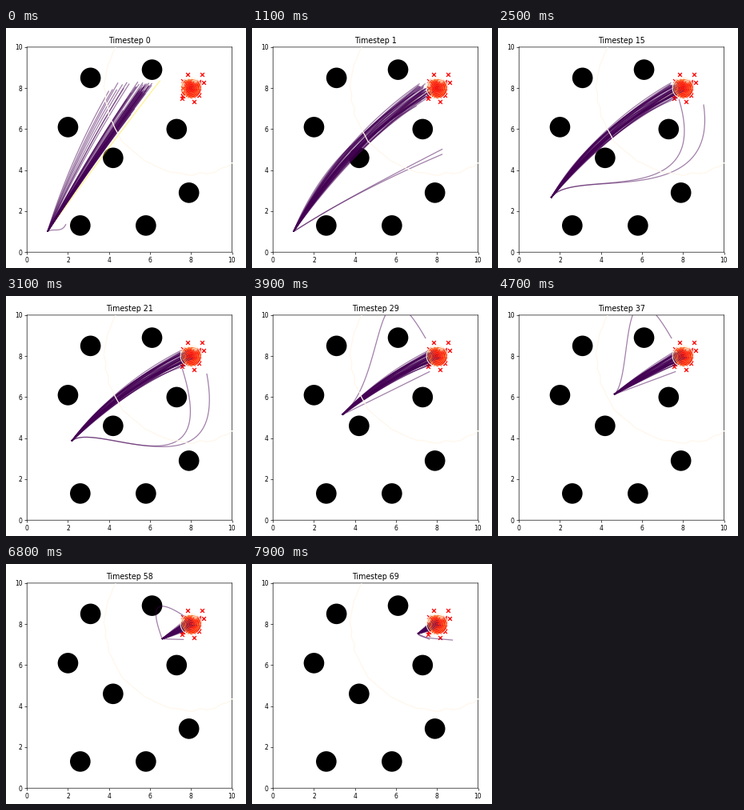
A matplotlib script that plays this animation: 300x300 px, repeating every 8000 ms.

```python
import numpy as np
import matplotlib.pyplot as plt
from matplotlib.animation import FuncAnimation
from matplotlib.collections import LineCollection
from matplotlib.patches import Circle

plt.rcParams["path.snap"] = False

HOLD = 10          # extra frames spent on timestep 0
FRAMES = 80
STEP_MS = 100
N_PATHS = 48
SWITCH = 29        # timestep at which the stray plans change sides
GOAL = np.array([8.0, 8.0])

OBSTACLES = [(3.1, 8.5), (6.1, 8.9), (2.0, 6.1), (7.3, 6.0),
             (4.2, 4.6), (2.6, 1.3), (5.8, 1.3), (7.9, 2.9)]

# Position of the robot, and cubic control points of the stray plan
TIMES = np.array([1, 10, 21, 37, 49, 69], float)
START = np.array([(1, 1), (1.21, 1.76), (2.18, 3.86),
                  (4.64, 6.13), (6.01, 6.95), (7.06, 7.53)])
STRAY = np.array([
    [(3, 2.3), (5.5, 3.6), (8.27, 5.03)],
    [(1.9, 3.6), (9.4, 2.6), (8.0, 7.5)],
    [(3.3, 4.9), (9.6, 1.0), (7.57, 7.4)],
    [(5.6, 6.9), (4.8, 13.5), (7.45, 8.86)],
    [(5.9, 8.0), (3.2, 12.6), (7.92, 8.5)],
    [(7.2, 7.3), (8.0, 7.3), (8.78, 7.22)],
])

rng = np.random.default_rng(4)
side = rng.normal(size=N_PATHS).clip(-1.8, 2.4)
tips = rng.normal(size=(N_PATHS, 2)).clip(-1.8, 1.8)
fan = rng.exponential(3.2, N_PATHS).clip(0, 14)
reach = rng.exponential(0.4, N_PATHS).clip(0, 2)
side[0], tips[0], fan[0], reach[0] = -0.6, 0, -1.2, -0.2
samples = np.vstack([
    GOAL + rng.normal(0, 0.22, (80, 2)).clip(-0.4, 0.4),
    [(7.84, 8.66), (8.55, 8.68), (8.62, 8.27), (8.16, 7.36), (7.57, 7.5)]])


def smooth(t, ys):
    """Cubic Hermite curve through the key values ys at TIMES."""
    slope = np.gradient(ys, TIMES, axis=0)
    t = np.clip(t, TIMES[0], TIMES[-1])
    i = int(np.clip(np.searchsorted(TIMES, t, "right") - 1, 0, len(TIMES) - 2))
    h = TIMES[i + 1] - TIMES[i]
    u = (t - TIMES[i]) / h
    return ((1 + 2 * u) * (1 - u) ** 2 * ys[i] + u * (1 - u) ** 2 * h * slope[i]
            + u * u * (3 - 2 * u) * ys[i + 1] + u * u * (u - 1) * h * slope[i + 1])


def blend(t, times, values):
    """Linear mix of the key values, held at both ends."""
    pos = np.interp(t, times, np.arange(len(times)))
    i = min(int(pos), len(times) - 2)
    return values[i] + (pos - i) * (values[i + 1] - values[i])


def cubic(a, b, c, d, stop=1.0):
    s = np.linspace(0, stop, 50)[:, None]
    r = 1 - s
    return r**3 * a + 3 * r * r * s * b + 3 * r * s * s * c + s**3 * d


def bowed(a, b, bow, stop=1.0):
    """Arc from a to b whose middle lies bow to the left of the chord."""
    chord = b - a
    normal = np.array([-chord[1], chord[0]]) / np.hypot(*chord)
    lift = normal * bow * 4 / 3
    return cubic(a, a + chord / 3 + lift, a + chord * 2 / 3 + lift, b, stop)


def first_guess():
    a = START[0]
    paths = []
    for f, r in zip(fan, reach):
        ang = np.radians(54.5 + f)
        length = 8.9 - 0.08 * f - r
        end = a + length * np.array([np.cos(ang), np.sin(ang)])
        paths.append(bowed(a, end, 0.06 + 0.012 * f))
    hook = cubic(a, a + (0.25, 0.2), a + (0.7, -0.1), a + (0.9, 0.37))
    return paths + [hook]


def strays(t, a):
    if t < SWITCH:
        b, c, d = blend(t, TIMES[:3], STRAY[:3])
        grow = min(1, (t - 1) / 9)
        twin = cubic(a, b, c + (0.3 * grow, 0), d + (1.2 * grow, -0.25))
    else:
        b, c, d = blend(t, TIMES[3:], STRAY[3:])
        twin = bowed(a, GOAL + (-0.35, -0.75), 0.0)
    return [cubic(a, b, c, d), twin]


def plans(t):
    if t == 0:
        return first_guess()
    a = smooth(t, START)
    end = GOAL - np.array([0.6, 0.2]) * np.exp(-t / 25)
    bow = 0.57 * np.clip((40 - t) / 30, 0, 1)
    width = 0.13 * np.exp(-t / 45)
    spread = 0.23 - 0.0015 * t
    young = np.clip(1 - (t - 1) / 8, 0, 1)
    paths = [bowed(a, end + spread * tip, bow + width * z,
                   1 - young * 0.3 * max(z - 0.8, 0))
             for z, tip in zip(side, tips)]
    return paths + strays(t, a)


def ring(r, angles):
    return GOAL[0] + r * np.cos(angles), GOAL[1] + r * np.sin(angles)


fig = plt.figure(figsize=(5, 5), dpi=60, facecolor="white")
ax = fig.add_axes([26.2 / 300, 19.8 / 300, 256.3 / 300, 256.3 / 300])
title = ax.set_title("Timestep 0", fontsize=11.4)
ax.tick_params(labelsize=9.2)

for spot in OBSTACLES:
    ax.add_patch(Circle(spot, 0.5, color="black", lw=0, zorder=0))
ax.scatter(*samples.T, marker="x", c="red", s=34, zorder=1)

viridis = plt.get_cmap("viridis")
colors = [viridis(1.0, alpha=0.5)] + [viridis(0.0, alpha=0.5)] * (N_PATHS + 1)
bundle = LineCollection([], colors=colors, linewidths=1.5, zorder=2)
ax.add_collection(bundle)

# Level lines of the goal density: one wide ragged edge, then tight rings
heat = plt.get_cmap("YlOrRd")
wide = np.radians(np.linspace(145, 305, 34))
ax.plot(*ring(4.2 + rng.normal(0, 0.035, wide.size), wide),
        color="#fff7ec", lw=1.5, zorder=3)
turn = np.linspace(0, 2 * np.pi, 90)
ax.plot(*ring(0.51, turn), color="#fff1dc", lw=1.3, zorder=3)
for u in np.linspace(0, 1, 8):
    ax.plot(*ring((0.44 - 0.4 * u) * (1 + 0.04 * np.sin(3 * turn + 7 * u)), turn),
            color=heat(0.52 + 0.2 * u), lw=1.1, zorder=3)

ax.set(xlim=(0, 10), ylim=(0, 10), xticks=range(0, 11, 2), yticks=range(0, 11, 2))


def draw(i):
    t = max(0, i - HOLD)
    title.set_text(f"Timestep {t}")
    bundle.set_segments(plans(t))
    return title, bundle


anim = FuncAnimation(fig, draw, frames=FRAMES, interval=STEP_MS,
                     repeat=True, repeat_delay=0, blit=False)
plt.show()
```
